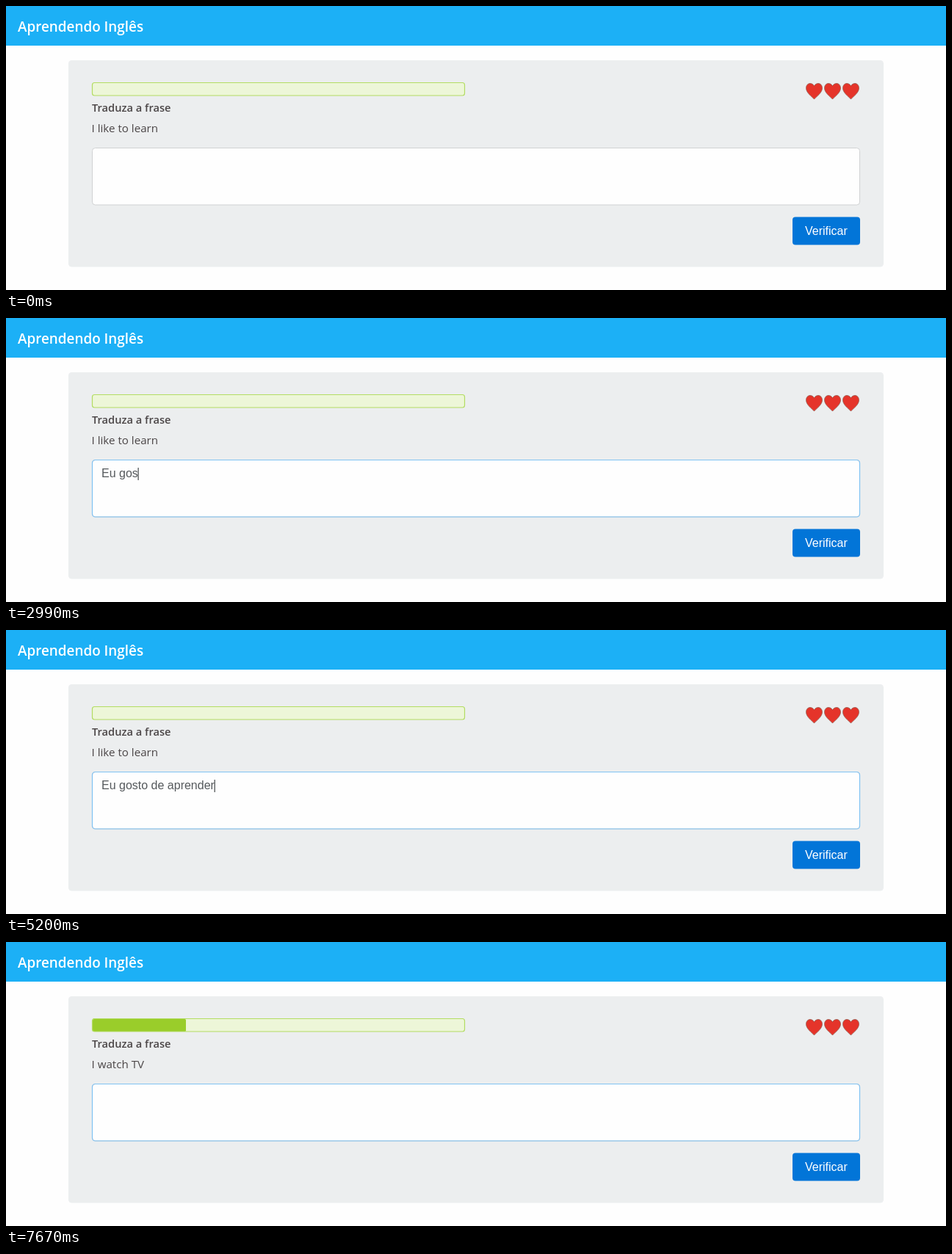
These frames come from a looping animation (1280x387 px, 8000 ms). An HTML page:

```html
<!DOCTYPE html>
<html lang="pt-BR">
<head>
<meta charset="utf-8">
<title>Aprendendo Inglês</title>
<style>
  html, body { margin: 0; width: 100%; height: 100%; overflow: hidden; background: #fefefe; }
  svg { display: block; width: 100%; height: 100%; }
  text { white-space: pre; }
  .ui { font-family: "Open Sans", "Noto Sans", sans-serif; fill: #4b4647; }
  .semi { font-weight: 600; }
  .form { font-family: "Liberation Sans", Arial, sans-serif; font-size: 16px; fill: #55595c; }
</style>
</head>
<body>
<svg viewBox="0 0 1280 387" preserveAspectRatio="none">
  <defs>
    <path id="heart" d="M0 21.5C-3 18-11 13-11 6.3C-11 2.500-8.500 0-5.500 0C-3 0-1 1.400 0 3.600C1 1.400 3 0 5.500 0C8.500 0 11 2.500 11 6.300C11 13 3 18 0 21.500Z"
      fill="#e5342a" stroke="#8a5a4c" stroke-width=".7"/>
  </defs>
  <rect width="1280" height="54" fill="#1cb0f6"/>
  <text class="ui semi" x="16" y="35" font-size="18.86" style="fill:#fff">Aprendendo Inglês</text>

  <rect x="85" y="74" width="1110" height="281.5" rx="4.500" fill="#eceeef"/>
  <rect x="117.500" y="104.500" width="507" height="17.500" rx="3" fill="#edf6d8"/>
  <rect id="bar" x="118" y="105" width="0" height="17" rx="1.500" fill="#9acd2a"/>
  <rect x="117.500" y="104.500" width="507" height="17.500" rx="3" fill="none" stroke="#b3dc62" stroke-width="1.200"/>
  <use href="#heart" x="1100.500" y="105.500"/>
  <use href="#heart" x="1125.500" y="105.500"/>
  <use href="#heart" x="1150.500" y="105.500"/>

  <text class="ui semi" x="117" y="143.500" font-size="14.65">Traduza a frase</text>
  <text id="phrase" class="ui" x="116.500" y="171.500" font-size="15.15"></text>

  <rect x="117.500" y="193.500" width="1045" height="77.500" rx="4" fill="#fefefe" stroke="#d0d2d3"/>
  <rect id="focus" x="117.500" y="193.500" width="1045" height="77.500" rx="4" fill="none" stroke="#7fc2f3" stroke-width="1.200"/>
  <text id="answer" class="form" x="130" y="217"></text>
  <rect id="caret" y="204" width="1.200" height="17" fill="#44484a"/>

  <rect id="ring" x="1069" y="286" width="96" height="41" rx="5.500" fill="#77b2e2"/>
  <rect x="1071" y="287.500" width="92" height="38" rx="4" fill="#0275d8"/>
  <rect id="hover" x="1071" y="287.500" width="92" height="38" rx="4" fill="#0262b6"/>
  <text class="form" x="1088" y="311.500" style="fill:#fff">Verificar</text>
  <path id="mouse" d="M0 0V14.500L3.400 11.400L5.800 17L8.200 16L5.800 10.600H10.400Z" fill="#fff" stroke="#333" stroke-width=".8"/>
</svg>
<script>
const LOOP = 8000, STEP = 130, BLINK = 520;
const FOCUS = 910, CLICK = 6110, REFOCUS = 7150;
const ANSWER = "Eu gosto de aprender";
// time at which each letter is typed
const KEYS = [2080, 2210, 2470, 2600, 2860, 2990, 3120, 3250, 3380, 3640,
              3900, 3900, 4030, 4160, 4290, 4420, 4550, 4680, 4940, 5070];
// pointer: time, x, y
const PATH = [[5590, 1066, 274], [5850, 1094, 300], [6110, 1097, 305], [6450, 1097, 305], [6700, 1070, 273]];

const el = Object.fromEntries([...document.querySelectorAll("[id]")].map(e => [e.id, e]));
const ramp = (t, a, b) => Math.min(1, Math.max(0, (t - a) / (b - a)));
const smooth = p => p * p * (3 - 2 * p);
const show = (e, on) => e.setAttribute("opacity", Number(on));

function setText(e, s) {
  if (e.textContent !== s) e.textContent = s;
}

function caretOn(t) {
  if (t < FOCUS || (t >= CLICK && t < REFOCUS)) return false;
  const start = t >= REFOCUS ? REFOCUS
    : KEYS.reduce((last, k) => k <= t ? k : last, FOCUS);
  return Math.floor((t - start) / BLINK) % 2 === 0;
}

function moveMouse(t) {
  const i = PATH.findIndex((p, n) => n && t < p[0]);
  const on = t >= PATH[0][0] && i > 0;
  show(el.mouse, on);
  if (!on) return;
  const [a, b] = [PATH[i - 1], PATH[i]];
  const p = smooth(ramp(t, a[0], b[0]));
  const at = n => a[n] + (b[n] - a[n]) * p;
  el.mouse.setAttribute("transform", `translate(${at(1)} ${at(2)})`);
}

function draw(ms) {
  const t = Math.floor((ms % LOOP) / STEP) * STEP;
  const done = t >= CLICK;
  setText(el.phrase, done ? "I watch TV" : "I like to learn");
  setText(el.answer, done ? "" : ANSWER.slice(0, KEYS.filter(k => k <= t).length));

  const typed = el.answer.textContent ? el.answer.getComputedTextLength() : 0;
  el.caret.setAttribute("x", 130 + typed - 0.3);
  show(el.caret, caretOn(t));

  show(el.focus, done ? ramp(t, REFOCUS - 80, REFOCUS + 120) : ramp(t, FOCUS - 50, FOCUS + 200));
  show(el.ring, done && t < REFOCUS);
  show(el.hover, ramp(t, 5650, 5850) - ramp(t, 6500, 6700));
  el.bar.setAttribute("width", 127 * smooth(ramp(t, CLICK, CLICK + 600)));
  moveMouse(t);
}

function tick(now) {
  draw(now);
  requestAnimationFrame(tick);
}
draw(0);
requestAnimationFrame(tick);
</script>
</body>
</html>
```
